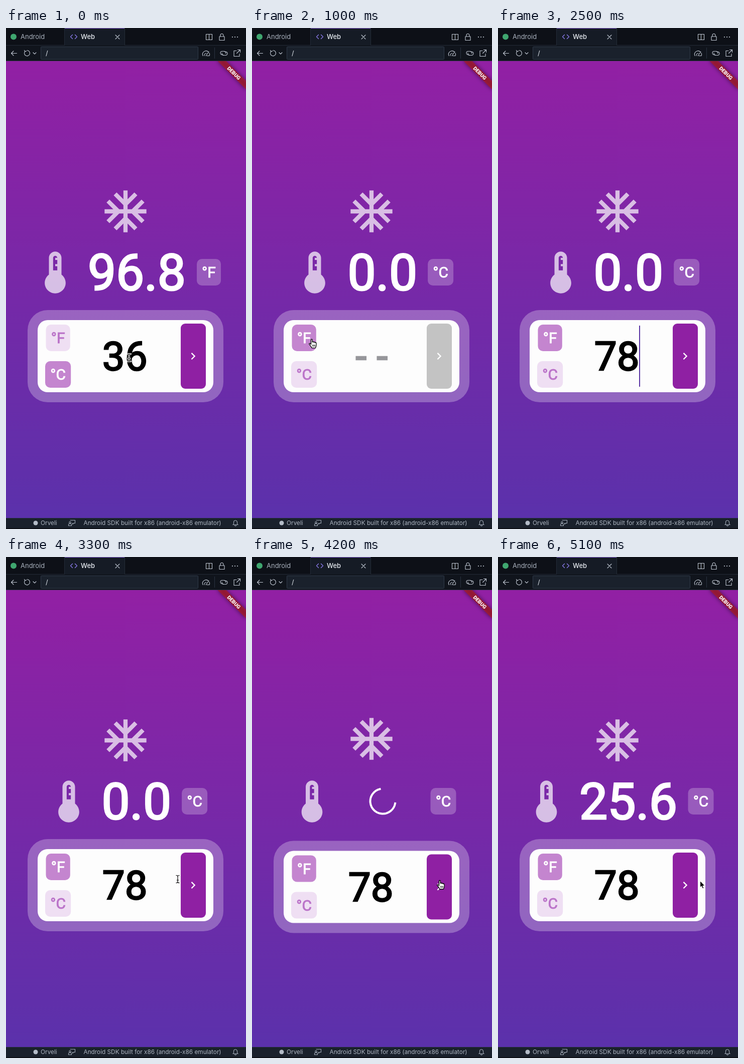
Animation of 478x1000 px, one loop 5.2 s. Source, as an HTML page:

```html
<!DOCTYPE html>
<html lang="en">
<head>
<meta charset="utf-8">
<title>Temperature converter</title>
<style>
  html, body { margin: 0; width: 100%; height: 100%; overflow: hidden; background: #0e1118; }
  svg { display: block; width: 100%; height: 100%; }
  text { white-space: pre; }
  .ui { font-family: Inter, "Open Sans", sans-serif; fill: #c3cad5; }
  .fat { font-family: Roboto, Arial, sans-serif; text-anchor: middle; stroke-width: .0313em; }
  .white { fill: #fff; stroke: #fff; }
  .black { fill: #000; stroke: #000; }
  .hint { fill: #97979b; stroke: #97979b; }
  .line { fill: none; stroke: #c3cad5; stroke-width: 1.1; stroke-linecap: round; stroke-linejoin: round; }
  .dim { stroke: #a3acb9; }
</style>
</head>
<body>
<svg viewBox="0 0 478 1000" preserveAspectRatio="none">
  <defs>
    <linearGradient id="sky" x1="0" y1="0" x2="0" y2="1">
      <stop offset="0" stop-color="#9220a4"/>
      <stop offset="1" stop-color="#5b31ab"/>
    </linearGradient>
    <filter id="soft" x="-30%" y="-150%" width="160%" height="400%">
      <feGaussianBlur stdDeviation="4"/>
    </filter>
  </defs>

  <rect y="66" width="478" height="912" fill="url(#sky)"/>

  <g id="flake">
    <path transform="translate(188 316) scale(4.1667)" fill="#fff" fill-opacity=".7" d="M22 11h-4.17l3.24-3.24-1.41-1.42L15 11h-2V9l4.66-4.66-1.42-1.41L13 6.17V2h-2v4.17L7.76 2.93 6.34 4.34 11 9v2H9L4.34 6.34 2.93 7.76 6.17 11H2v2h4.17l-3.24 3.24 1.41 1.42L9 13h2v2l-4.66 4.66 1.42 1.41L11 17.83V22h2v-4.17l3.24 3.24 1.42-1.41L13 15v-2h2l4.66 4.66 1.41-1.42L17.83 13H22z"/>
  </g>

  <g id="thermo">
    <path transform="translate(-50 438) scale(4.1667)" fill="#fff" fill-opacity=".7" d="M15 13V5c0-1.66-1.34-3-3-3S9 3.34 9 5v8c-1.21.91-2 2.37-2 4 0 2.76 2.24 5 5 5s5-2.24 5-5c0-1.63-.79-3.09-2-4zm-4-8c0-.55.45-1 1-1s1 .45 1 1h-1v1h1v2h-1v1h1v2h-2V5z"/>
  </g>
  <text id="result" class="fat white" y="522.5" font-size="100"></text>
  <path id="spinner" fill="none" stroke="#fff" stroke-width="4" stroke-linecap="square"/>
  <g id="badge">
    <rect y="461" height="53" rx="10" fill="#fff" fill-opacity=".24"/>
    <text class="fat white" y="498.3" font-size="30"></text>
  </g>

  <g id="panel">
    <rect x="43" y="563" width="390" height="184" rx="40" fill="#fff" fill-opacity=".27"/>
    <rect x="63" y="583" width="350" height="144" rx="20" fill="#fdfdfd"/>
    <g id="unitF">
      <rect x="79.5" y="592" width="48.3" height="53" rx="10"/>
      <text class="fat" x="103.6" y="629.3" font-size="30">°F</text>
    </g>
    <g id="unitC">
      <rect x="78" y="665" width="51.2" height="53" rx="10"/>
      <text class="fat" x="103.6" y="702.3" font-size="30">°C</text>
    </g>
    <text id="entry" class="fat" x="236.8" y="683" font-size="80"></text>
    <rect id="caret" y="594" width="2" height="122" fill="#5a35a5"/>
    <rect id="go" x="348" y="590" width="50" height="130" rx="9"/>
    <path transform="translate(358.6 641) scale(1.17)" fill="#fff" d="M10 6 8.59 7.41 13.17 12l-4.58 4.59L10 18l6-6z"/>
  </g>

  <g transform="translate(478 66) rotate(45)">
    <rect x="-40" y="28" width="80" height="12" fill="#000" fill-opacity=".5" filter="url(#soft)"/>
    <rect x="-40" y="28" width="80" height="12" fill="#b71c1c" fill-opacity=".63"/>
    <text x="0" y="37.7" font-family="Roboto, Arial, sans-serif" font-size="10.2" font-weight="800" text-anchor="middle" fill="#fff">DEBUG</text>
  </g>

  <!-- window bars -->
  <rect width="478" height="66" fill="#10141c"/>
  <rect width="478" height="35" fill="#0d1017"/>
  <path d="M0 34.5H478M0 65.5H478M116.5 0V34M236.5 0V34" stroke="#232b37" fill="none"/>
  <rect x="117" width="119" height="35" fill="#151b25"/>
  <rect x="117" width="119" height="1" fill="#8a63d8"/>
  <circle cx="15" cy="17.5" r="6" fill="#3fa66f"/>
  <text class="ui" x="29" y="22" font-size="13" style="fill:#aab2be">Android</text>
  <path class="line" style="stroke:#8d7cf0;stroke-width:1.3" d="M132.500 13.500 128.500 17.500l4 4M137.500 13.500l4 4-4 4"/>
  <text class="ui" x="149" y="22" font-size="13" font-weight="500" style="fill:#e8ecf2">Web</text>
  <path class="line" d="M218 14l8 8M226 14l-8 8"/>
  <path class="line" d="M398.500 12.500h12v11h-12zM404.500 12.500v11"/>
  <path class="line" d="M425 17h10v7.500h-10zM427 17v-2.500a3 3 0 0 1 6 0V17"/>
  <g fill="#c3cad5">
    <circle cx="451" cy="18" r="1.1"/><circle cx="456" cy="18" r="1.1"/><circle cx="461" cy="18" r="1.1"/>
  </g>

  <path class="line" d="M21.500 50.500H10.500M15 46l-4.500 4.500L15 55"/>
  <path class="line" d="M38 46.500a5.500 5.500 0 1 0 4-1.700M36.500 44.500l1.500 2.500 2.800-1M54 49l3 3 3-3"/>
  <rect x="69.500" y="37.500" width="313" height="25" rx="1" fill="#1a212c" stroke="#303b4a"/>
  <text class="ui" x="79" y="55" font-size="13" style="fill:#e0e5ec">/</text>
  <path class="line" d="M392 55.500a7 7 0 0 1 11-8M405 50a7 7 0 0 1 0 5.500M395 55.500a4 4 0 0 1 4-5M398 55.500l6-8M400 55.500h4"/>
  <path d="M415.500 39V61" stroke="#2a3340"/>
  <path class="line" d="M432.500 53.500h-2a3.500 3.500 0 0 1 0-7h4a3.500 3.500 0 0 1 3.300 4.500M435.500 47.500h2a3.500 3.500 0 0 1 0 7h-4a3.500 3.500 0 0 1-3.300-4.500"/>
  <path class="line" d="M459 45.500h-5v11h11v-5M461.500 43.500h5v5M466.500 43.500l-7 7"/>

  <rect y="978" width="478" height="22" fill="#1a212c"/>
  <path d="M0 978.500H478" stroke="#252d3a"/>
  <path d="M0 999H478" stroke="#0d1017" stroke-width="2"/>
  <circle cx="59" cy="988" r="4.500" fill="#b3bbc7"/>
  <g font-size="11.8">
    <text class="ui" x="69" y="992" style="fill:#adb5c1">Orveli</text>
    <text class="ui" x="154.500" y="992" style="fill:#adb5c1">Android SDK built for x86 (android-x86 emulator)</text>
  </g>
  <path class="line dim" d="M128 982.500h9.500v6h-3l-2 2v-2M124.500 993.500v-1.500a3 3 0 0 1 6 0v1.500z"/>
  <circle class="line dim" cx="127.500" cy="987" r="1.700"/>
  <path class="line dim" d="M452 991.500h10l-1.500-2v-3a3.500 3.500 0 0 0-7 0v3zM455.500 992.500a1.500 1.500 0 0 0 3 0"/>

  <!-- pointers, each around its own middle -->
  <g id="beam" fill="none" stroke-linecap="square">
    <path id="beamLine" d="M-3-7.500Q0-7.500 0-5.500Q0-7.500 3-7.500M0-5.500V5.500M-3 7.500Q0 7.500 0 5.500Q0 7.500 3 7.500M-1.500 2H1.500" stroke="#fff" stroke-width="3"/>
    <use href="#beamLine" style="stroke:#000"/>
    <path d="M-3-7.500Q0-7.500 0-5.500Q0-7.500 3-7.500M0-5.500V5.500M-3 7.500Q0 7.500 0 5.500Q0 7.500 3 7.500M-1.500 2H1.500" stroke="#000" stroke-width="1.200"/>
  </g>
  <g id="hand" stroke-linejoin="round" stroke-linecap="round">
    <path d="M-3.500 2V-7Q-3.500-8.500-2.200-8.500T-.8-7V-2.500Q-.5-3.800.8-3.500T2-2Q2.300-3.200 3.500-2.900T4.600-1.200Q5-2.200 6-1.900T7 0V3.500Q6.800 6 5.300 9H-2Q-3 6.500-5 4.300L-7 1.500Q-7.500 0-6-.1Q-5 0-3.500 2z" fill="#fff" stroke="#000" stroke-width="1.300"/>
    <path d="M-.2 3V6M2 3V6M4.200 3V6" stroke="#000" fill="none"/>
  </g>
  <g id="arrow">
    <path d="M-3.500-8V6L-.5 3.200 1.500 8 4 7 2 2.400H6.300z" fill="#000" stroke="#fff" stroke-width="1.100" stroke-linejoin="round"/>
  </g>
</svg>

<script>
const LOOP = 5200, STEP = 100;
const SWITCH = 800, FOCUS = 1400, KEY1 = 2100, KEY2 = 2400, LOAD = 3765, DONE = 4900;
const SPIN = { x: 260.5, y: 487.5, r: 25 };

// mouse: time, x, y; eased between stops
const path = [
  [0, 245, 658], [100, 245, 658], [500, 104, 630], [900, 104, 630], [1300, 213, 627],
  [3000, 213, 627], [3300, 342, 643], [3600, 376, 654], [4900, 376, 654], [5100, 406, 654], [5200, 406, 654]
];

const el = id => document.getElementById(id);
const set = (node, attrs) => { for (const k in attrs) node.setAttribute(k, attrs[k]); };
const show = (node, on) => set(node, { visibility: on ? "visible" : "hidden" });
const clamp = v => Math.min(1, Math.max(0, v));
const smooth = v => v * v * (3 - 2 * v);

// cubic-bezier(.4, 0, .2, 1)
function fastOutSlowIn(x) {
  let lo = 0, hi = 1;
  for (let i = 0; i < 24; i++) {
    const s = (lo + hi) / 2, q = 1 - s;
    if (1.2 * q * q * s + .6 * q * s * s + s * s * s < x) lo = s; else hi = s;
  }
  return lo * lo * (3 - 2 * lo);
}

function spinnerArc(ms) {
  const phase = ms / 1333 % 1;
  const head = fastOutSlowIn(clamp(phase * 2));
  const tail = fastOutSlowIn(clamp(phase * 2 - 1));
  const from = Math.PI * (-.5 + 1.5 * tail + 2 * ms / 2222 + .5 * phase);
  const sweep = Math.max(1.5 * Math.PI * (head - tail), .001);
  const at = a => `${SPIN.x + SPIN.r * Math.cos(a)} ${SPIN.y + SPIN.r * Math.sin(a)}`;
  return `M${at(from)}A${SPIN.r} ${SPIN.r} 0 ${sweep > Math.PI ? 1 : 0} 1 ${at(from + sweep)}`;
}

function rowAt(t) {
  if (t < SWITCH) return { thermo: 98, x: 260.4, text: "96.8", badge: 404, unit: "°F" };
  if (t < LOAD) return { thermo: 125, x: 259.8, text: "0.0", badge: 375.6, unit: "°C" };
  if (t < DONE) return { thermo: 119.5, x: 260.5, text: "", badge: 381, unit: "°C" };
  return { thermo: 96.5, x: 259.5, text: "25.6", badge: 404, unit: "°C" };
}

function mouseAt(t) {
  let i = 0;
  while (i < path.length - 2 && t >= path[i + 1][0]) i++;
  const [t0, x0, y0] = path[i], [t1, x1, y1] = path[i + 1];
  const k = smooth(clamp((t - t0) / (t1 - t0)));
  return { x: x0 + (x1 - x0) * k, y: y0 + (y1 - y0) * k };
}

function pointerKind(t, x) {
  if (t >= 2000 && t < 3100) return "none";
  if (x < 129 || x >= 348 && x < 399) return "hand";
  return x >= 139 && x < 348 ? "beam" : "arrow";
}

function caretOn(t) {
  if (t < FOCUS || t >= LOAD) return false;
  const since = t >= KEY2 ? KEY2 : t >= KEY1 ? KEY1 : FOCUS;
  return Math.floor((t - since) / 500) % 2 === 0;
}

function paintUnit(id, on) {
  const [box, label] = el(id).children;
  set(box, { fill: on ? "#c485cf" : "#efdff3" });
  const ink = on ? "#fff" : "#bb74c9";
  set(label, { fill: ink, stroke: ink });
}

function draw(t) {
  const loading = t >= LOAD && t < DONE;
  const row = rowAt(t);

  set(el("flake"), { transform: `translate(0 ${loading ? -3 : 0})` });
  set(el("panel"), { transform: `translate(0 ${loading ? 3.5 : 0})` });
  set(el("thermo"), { transform: `translate(${row.thermo} 0)` });
  set(el("result"), { x: row.x });
  el("result").textContent = row.text;

  const [box, label] = el("badge").children;
  const width = row.unit === "°F" ? 48 : 51;
  set(box, { x: row.badge - width / 2, width });
  set(label, { x: row.badge });
  label.textContent = row.unit;

  show(el("spinner"), loading);
  if (loading) set(el("spinner"), { d: spinnerArc(t - LOAD) });

  paintUnit("unitF", t >= SWITCH);
  paintUnit("unitC", t < SWITCH);

  const value = t < SWITCH ? "36" : t < KEY1 ? "" : t < KEY2 ? "7" : "78";
  el("entry").textContent = value || "- -";
  set(el("entry"), { class: "fat " + (value ? "black" : "hint"), x: value ? 236.8 : 238.3 });
  set(el("go"), { fill: value ? "#8f20a3" : "#c3c3c3" });
  show(el("caret"), caretOn(t));
  set(el("caret"), { x: 235 + 23 * value.length });

  const { x, y } = mouseAt(t);
  const kind = pointerKind(t, x);
  for (const id of ["beam", "hand", "arrow"]) {
    show(el(id), id === kind);
    set(el(id), { transform: `translate(${x} ${y})` });
  }
}

const start = performance.now();
function tick() {
  const t = (performance.now() - start) % LOOP;
  draw(Math.floor(t / STEP) * STEP);
  requestAnimationFrame(tick);
}
draw(0);
requestAnimationFrame(tick);
</script>
</body>
</html>
```
